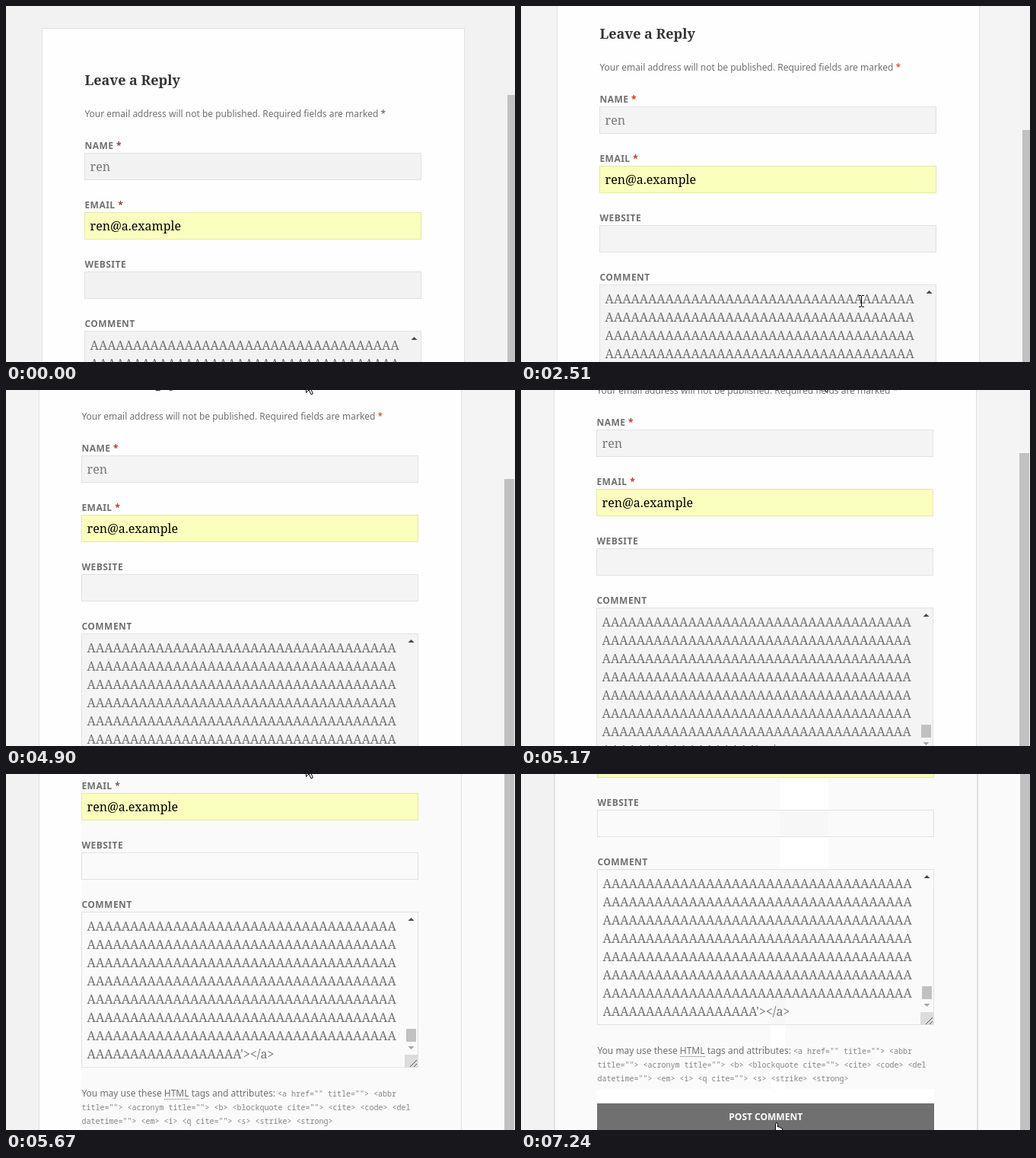
An HTML page with a canvas that plays this animation: 669 px wide and 468 px high, repeating every 8 s.

```html
<!DOCTYPE html>
<html lang="en">
<head>
<meta charset="utf-8">
<title>Leave a Reply</title>
<style>
html, body { margin: 0; width: 669px; height: 468px; overflow: hidden; background: #f2f2f2; }
canvas { display: block; }
</style>
</head>
<body>
<canvas id="stage" width="669" height="468"></canvas>
<script>
const ctx = document.getElementById('stage').getContext('2d', { alpha: false });
const W = 669, H = 468, LOOP = 8000;
const SERIF = '"Noto Serif", serif', SANS = '"Noto Sans", "Open Sans", sans-serif';
const MONO = '10px "Noto Sans Mono", monospace';
const GREY = '#707070';

// time, window x, page scroll, window y
const poses = [
  [0, 0, 0, 0], [560, 0, 25, 0], [680, 0, 50, 0], [830, 0, 61, 0],
  [4780, -2, 61, -22], [4900, -4, 61, -46], [5050, -4, 61, -65],
  [5170, -4, 61, -80], [5290, -4, 61, -108], [5430, -4, 61, -140],
  [5550, -4, 61, -166], [5670, -4, 61, -185], [5820, -3, 61, -218],
  [5970, -3, 61, -241]
];

// time, shape, x, y
const pointer = [
  [0, null, 0, 0], [2510, beam, 444, 380], [2630, arrow, 438, 329],
  [2750, arrow, 432, 280], [3030, arrow, 412, 90], [3190, arrow, 403, 29],
  [3340, arrow, 399, 13], [3460, arrow, 397, 5], [3620, arrow, 397, 4],
  [4050, arrow, 395, -5], [4200, arrow, 394, -10], [4320, arrow, 394, -13],
  [5050, arrow, 394, -16], [5290, arrow, 394, -13],
  [6530, beam, 340, 274], [6680, arrow, 328, 414],
  [6960, hand, 318, 449], [7120, hand, 325, 454], [7240, hand, 331, 458]
];

const tones = {
  start: { bg: '#f2f2f2', card: '#fefefe', field: '#f2f2f2', star: '#8c4343' },
  main: { bg: '#f4f4f4', card: '#fefefe', field: '#f4f4f4', star: '#c0392b' },
  edge: { bg: '#f2f2f2', card: '#fefefe', field: '#f4f4f4', star: '#c0392b' },
  wash: { bg: '#fafafa', card: '#fafafa', field: '#fafafa', star: '#8a5050' },
  fresh: { bg: '#fafafa', card: '#ffffff', field: '#f7f7f7', star: '#8a5050' }
};

const at = (list, t) => list.findLast(k => k[0] <= t);

function rect(color, x, y, w, h) {
  ctx.fillStyle = color;
  ctx.fillRect(x, y, w, h);
}

function text(str, x, y, font, color, spacing = 0) {
  ctx.font = font;
  ctx.fillStyle = color;
  ctx.letterSpacing = spacing + 'px';
  ctx.fillText(str, x, y);
  return x + ctx.measureText(str).width;
}

function poly(color, points) {
  ctx.beginPath();
  points.forEach(p => ctx.lineTo(p[0], p[1]));
  ctx.closePath();
  ctx.fillStyle = color;
  ctx.fill();
}

function label(str, y, star) {
  const font = 'bold 12px ' + SANS;
  const end = text(str, 103.4, y, font, GREY, 0.48);
  if (star) text(' *', end, y, font, star, 0.48);
}

function field(y, h, fill, border = '#e2e2e2') {
  rect(border, 103, y, 443, h);
  rect(fill, 104, y + 1, 441, h - 2);
}

function commentBox(tone) {
  field(427, 205, tone.field);
  const font = '16px ' + SERIF;
  for (let i = 0; i < 8; i++) {
    const line = i < 7 ? 'A'.repeat(36) : 'A'.repeat(18) + "'></a>";
    text(line, 110.6, 452 + i * 24, font, GREY);
  }
  poly('#484848', [[532.5, 439], [536.5, 435], [540.5, 439]]);
  rect('#c1c1c1', 530, 581, 13, 17);
  poly('#a3a3a3', [[532.5, 604], [540.5, 604], [536.5, 608]]);
  rect('#dcdcdc', 528, 615, 17, 17);
  ctx.strokeStyle = '#555';
  ctx.lineWidth = 1;
  ctx.beginPath();
  ctx.moveTo(535, 631);
  ctx.lineTo(544, 622);
  ctx.moveTo(540, 631);
  ctx.lineTo(544, 627);
  ctx.stroke();
}

function hints() {
  const font = '12px ' + SANS;
  let x = text('You may use these ', 103.4, 670, font, GREY);
  const end = text('HTML', x, 670, font, GREY);
  for (; x < end; x += 2) rect(GREY, Math.round(x), 673, 1, 1);
  x = text(' tags and attributes: ', end, 670, font, GREY);
  const code = '#858585';
  text('<a href="" title=""> <abbr', x, 670, MONO, code);
  text('title=""> <acronym title=""> <b> <blockquote cite=""> <cite> <code> <del', 103.4, 688, MONO, code);
  text('datetime=""> <em> <i> <q cite=""> <s> <strike> <strong>', 103.4, 706, MONO, code);
}

function page(t, tone, clip = [0, 0, W, H]) {
  const [, wx, scroll, wy] = at(poses, t);
  ctx.save();
  ctx.beginPath();
  ctx.rect(...clip);
  ctx.clip();
  rect(tone.bg, 0, 0, W, H);

  ctx.translate(wx, wy);
  rect('#c1c1c1', 659, 117 + Math.round(scroll * 46 / 61), 13, 700);
  ctx.translate(0, -scroll);

  const edge = t >= 5820 ? 2 : 1;
  rect('#e2e2e2', 48 - edge, 29, 554 + 2 * edge, 900);
  rect(tone.card, 48, 30, 554, 900);

  text('Leave a Reply', 103.4, 104, 'bold 18px ' + SERIF, '#333');
  const small = '12px ' + SANS;
  const end = text('Your email address will not be published. Required fields are marked ', 103.4, 146, small, GREY);
  text('*', end, 146, small, tone.star);

  const input = '16px ' + SERIF;
  label('NAME', 188, tone.star);
  field(193, 36, tone.field);
  text('ren', 110.6, 217, input, '#777');
  label('EMAIL', 266, tone.star);
  field(271, 36, '#faffbd', '#e4e7b0');
  text('ren@a.example', 110.6, 295, input, '#000');
  label('WEBSITE', 344);
  field(349, 36, tone.field);
  label('COMMENT', 422);
  commentBox(tone);
  hints();

  rect(t >= 6960 ? GREY : '#333', 103, 735, 443, 42);
  ctx.textAlign = 'center';
  text('POST COMMENT', 324.7, 757, 'bold 12px ' + SANS, '#fff');
  ctx.textAlign = 'left';
  ctx.restore();
}

function outline(path) {
  const p = new Path2D(path);
  ctx.fillStyle = '#fff';
  ctx.fill(p);
  ctx.strokeStyle = '#000';
  ctx.lineWidth = 1;
  ctx.stroke(p);
}

function arrow() {
  outline('M.5 .5V16.5L4.3 12.9L7 18.9L9.4 17.9L6.8 12H11.5Z');
}

function beam() {
  rect('#000', 3, 1, 1, 14);
  rect('#000', 0, 0, 3, 1);
  rect('#000', 4, 0, 3, 1);
  rect('#000', 0, 15, 3, 1);
  rect('#000', 4, 15, 3, 1);
}

function hand() {
  outline('M3.5 11V2.5Q3.5 .5 5 .5T6.5 2.5V6Q9 5 9.3 7Q11 6.2 11.3 8Q13 7.8 12.8 10V14L11 19H5L1 12.5Q0 10 1.5 10Z');
}

function draw(t) {
  if (t < 560) page(t, tones.start);
  else page(t, t < 5430 ? tones.main : tones.edge);
  if (t >= 5430) page(t, tones.wash, [t < 5820 ? 99 : 44, 0, W, H]);
  if (t >= 6530) page(t, tones.fresh, [340, 0, 64, 290]);
  if (t >= 6680) page(t, tones.fresh, [328, 274, 19, 159]);
  if (t >= 6960) page(t, tones.fresh, [100, 414, 443, 54]);

  const [, shape, x, y] = at(pointer, t);
  if (shape) {
    ctx.save();
    ctx.translate(x, y);
    shape();
    ctx.restore();
  }
}

function tick() {
  draw(performance.now() % LOOP);
  requestAnimationFrame(tick);
}
tick();
</script>
</body>
</html>
```
